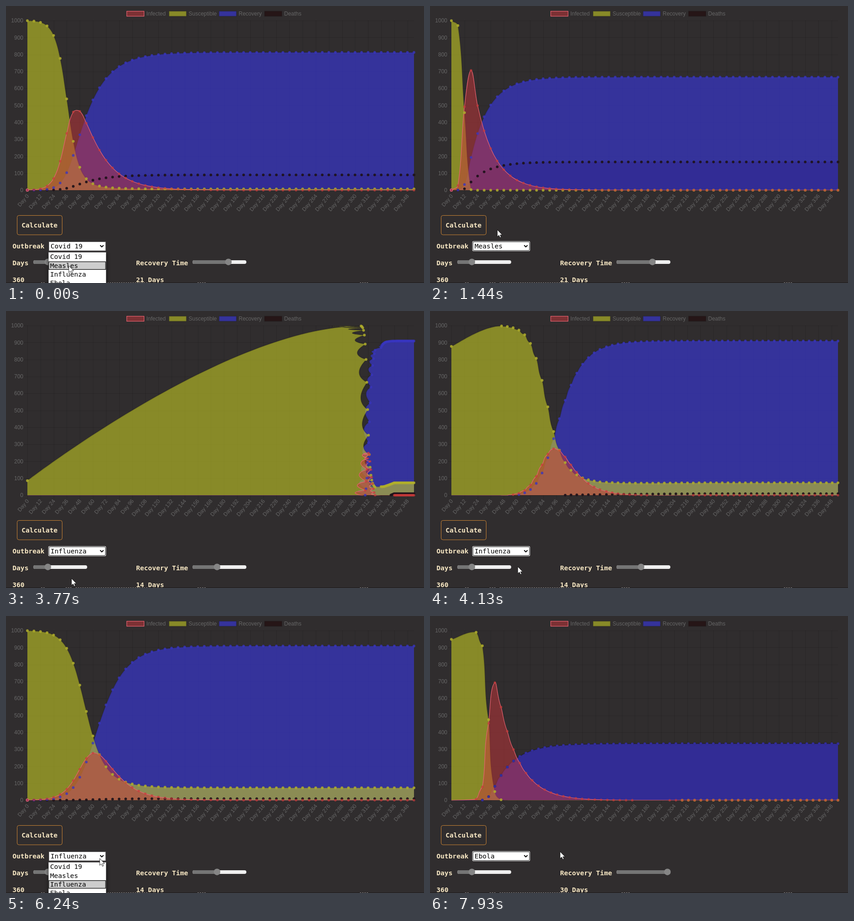
An HTML page with a canvas for the animation above (8000 ms loop, 919x609 px).

```html
<!DOCTYPE html>
<html lang="en">
<head>
<meta charset="utf-8">
<title>Outbreak chart</title>
<style>
  html, body { margin: 0; width: 100%; height: 100%; overflow: hidden; background: #302d2e; }
  svg, canvas { position: absolute; left: 0; top: 0; width: 919px; height: 609px; }
  .axis text { font: 12px "Liberation Sans", Arial, sans-serif; fill: #666; }
  .ui text { font: 14.6px "DejaVu Sans Mono", monospace; fill: #000; }
  .ui .b { font-weight: bold; fill: #f8e8c4; }
</style>
</head>
<body>
<svg id="axis" class="axis" viewBox="0 0 919 609">
  <g id="grid" stroke="#000" stroke-opacity=".13"></g>
  <g id="ticks"></g>
  <g id="legend"></g>
</svg>
<canvas id="chart" width="919" height="609"></canvas>
<svg class="ui" viewBox="0 0 919 609">
  <defs>
    <filter id="soft" x="-20%" y="-20%" width="140%" height="140%"><feGaussianBlur stdDeviation="3"/></filter>
  </defs>
  <rect x="24.5" y="460.5" width="99" height="42.5" rx="4" fill="none" stroke="#cb8434"/>
  <text class="b" x="34.3" y="486.5">Calculate</text>
  <text class="b" x="14.3" y="533">Outbreak</text>
  <text class="b" x="14.3" y="570">Days</text>
  <text class="b" x="286" y="570">Recovery Time</text>
  <text class="b" x="14.3" y="607">360</text>
  <text class="b" x="286" y="607" id="span"></text>

  <rect x="60" y="559" width="118.5" height="8" rx="4" fill="#efefef"/>
  <rect x="60" y="559" width="34" height="8" rx="4" fill="#757575"/>
  <circle cx="92" cy="562.7" r="7.2" fill="#858585"/>
  <rect x="410" y="559" width="118.5" height="8" rx="4" fill="#efefef"/>
  <rect x="410" y="559" width="80" height="8" rx="4" fill="#757575" id="bar"/>
  <circle cx="489" cy="562.7" r="7.2" fill="#858585" id="thumb"/>

  <rect y="608" width="919" height="1" fill="#1c1a1b"/>
  <path d="M77 608.5h9M131 608.5h13M153 608.5h160M421 608.5h20M778 608.5h18" stroke="#8a8788" stroke-dasharray="3 2"/>

  <g id="ring">
    <rect x="93" y="517" width="127" height="22" rx="3" fill="#fff"/>
    <rect x="94.5" y="518.5" width="124" height="19" rx="1.5" fill="#fff" stroke="#101010"/>
  </g>
  <rect id="plain" x="94.5" y="518.5" width="124.5" height="19.5" fill="#fff" stroke="#767676"/>
  <text x="98" y="533" id="choice"></text>
  <path d="M207 526l3.7 3.7 3.7-3.7" fill="none" stroke="#000" stroke-width="2"/>

  <g id="menu">
    <rect x="91" y="544" width="133" height="80" fill="#000" opacity=".35" filter="url(#soft)"/>
    <rect x="93.5" y="541.5" width="126.5" height="80" fill="#fff" stroke="#767676" stroke-width=".5"/>
    <rect id="hover" x="94" width="125" height="17" fill="#cdcdcd" stroke="#101010" stroke-width="1.3"/>
    <g id="rows"></g>
  </g>
  <path id="mouse" d="M0 0V15.2L3.5 12L6 17.3L8.4 16.2L6.1 11.2H10.8Z" fill="#fff" stroke="#000" stroke-width=".8"/>
</svg>
<script>
const $ = id => document.getElementById(id);
const L = 47, R = 897, TOP = 32, BOT = 405, N = 60;
const STEP = (R - L) / (N - 1);
const LOOP = 8000;

// beta: infections per day, days: recovery time, p: death rate
const outbreaks = [
  { name: 'Covid 19', beta: .25, days: 21, p: .1, thumb: 489 },
  { name: 'Measles', beta: .8, days: 21, p: .2, thumb: 489 },
  { name: 'Influenza', beta: .2, days: 14, p: .01, thumb: 464 },
  { name: 'Ebola', beta: .5, days: 30, p: .5, thumb: 522 }
];

// Back to front
const shade = 'rgba(0,0,0,.12)';
const styles = {
  D: { label: 'Deaths', at: 568, fill: 'rgba(28,0,0,.5)', line: shade, width: 2.4, dot: 'rgba(30,18,26,.92)', r: 2.9 },
  R: { label: 'Recovery', at: 468, fill: 'rgba(56,55,203,.7)', line: shade, width: 2.4, dot: 'rgba(56,54,192,.78)', r: 2.9 },
  S: { label: 'Susceptible', at: 358, fill: 'rgba(196,200,38,.6)', line: shade, width: 2.4, dot: 'rgba(176,174,44,.85)', r: 3 },
  I: { label: 'Infected', at: 265, fill: 'rgba(200,55,58,.5)', line: 'rgb(232,98,112)', width: 1.2, dot: 'rgba(200,58,58,.68)', r: 2.7 }
};

function simulate({ beta, days, p }) {
  const out = { S: [], I: [], R: [], D: [] };
  let s = 999, i = 1;
  for (let day = 0; day < N * 6; day++) {
    if (day % 6 === 0) {
      const gone = (1000 - s - i) / (1 + p);
      out.S.push(s);
      out.I.push(i);
      out.R.push(gone * (1 - p));
      out.D.push(gone * p);
    }
    const fresh = beta * s * i / 1000;
    s -= fresh;
    i += fresh - i * (1 + p) / days;
  }
  return out;
}

const clamp = (v, a, b) => Math.max(a, Math.min(b, v));
const mix = (a, b, e) => a + (b - a) * e;
const yOf = (v, bottom) => bottom - v / 1000 * (bottom - TOP);

// Smooth handles [x, y, inX, inY, outX, outY] around a point
function handles(a, b, c, right, bottom) {
  const d1 = Math.hypot(b[0] - a[0], b[1] - a[1]);
  const d2 = Math.hypot(c[0] - b[0], c[1] - b[1]);
  const fa = .4 * d1 / (d1 + d2 || 1), fb = .4 * d2 / (d1 + d2 || 1);
  const dx = c[0] - a[0], dy = c[1] - a[1];
  return [b[0], b[1],
    clamp(b[0] - fa * dx, L, right), clamp(b[1] - fa * dy, TOP, bottom),
    clamp(b[0] + fb * dx, L, right), clamp(b[1] + fb * dy, TOP, bottom)];
}

function settled(vals) {
  const pts = vals.map((v, i) => [L + i * STEP, yOf(v, BOT)]);
  return pts.map((b, i) => handles(pts[i - 1] || b, b, pts[i + 1] || b, R, BOT));
}

// Each point enters at the right edge; tilting labels shrink the plot as they fill up
function entering(vals) {
  return vals.map((v, i) => {
    if (!i) return [L, BOT + 17, L, BOT + 17, L, BOT + 17];
    const right = i < 19 ? R - 13 : R;
    const bottom = BOT + (i < 19 ? 17 : Math.max(0, 14 * (1 - (i - 19) / 16)));
    const b = [right, yOf(v, bottom)];
    const a = [right - (right - L) / i, yOf(vals[i - 1], bottom)];
    return handles(a, b, b, right, bottom);
  });
}

const shapes = outbreaks.map(o => {
  const data = simulate(o), set = {};
  for (const k in data) set[k] = { from: entering(data[k]), to: settled(data[k]) };
  return set;
});

const ctx = $('chart').getContext('2d');

function trace(pts) {
  ctx.moveTo(pts[0][0], pts[0][1]);
  for (let i = 1; i < N; i++) {
    const a = pts[i - 1], b = pts[i];
    ctx.bezierCurveTo(a[4], a[5], b[2], b[3], b[0], b[1]);
  }
}

function area(pts, style) {
  ctx.save();
  ctx.beginPath();
  ctx.rect(L - .5, TOP - 1, R - L + 1, BOT - TOP + 1.5);
  ctx.clip();
  ctx.beginPath();
  trace(pts);
  ctx.lineTo(R, BOT);
  ctx.lineTo(L, BOT);
  ctx.closePath();
  ctx.fillStyle = style.fill;
  ctx.fill();
  ctx.beginPath();
  trace(pts);
  ctx.strokeStyle = style.line;
  ctx.lineWidth = style.width;
  ctx.stroke();
  ctx.restore();
}

const inside = y => y < BOT + .08;

function dots(pts, style) {
  ctx.fillStyle = style.dot;
  for (const [x, y] of pts) {
    if (!inside(y)) continue;
    ctx.beginPath();
    ctx.arc(x, y, style.r, 0, 7);
    ctx.fill();
  }
}

function drawChart(index, e) {
  const now = {};
  for (const k in styles) {
    const { from, to } = shapes[index][k];
    now[k] = to.map((b, i) => b.map((v, j) => mix(from[i][j], v, e)));
  }
  ctx.clearRect(0, 0, 919, 609);
  for (const k in styles) area(now[k], styles[k]);
  for (const k in styles) dots(now[k], styles[k]);
  const [x, y] = now.I[0];
  if (inside(y)) {
    ctx.beginPath();
    ctx.arc(x, y, 2.8, 0, 7);
    ctx.strokeStyle = styles.I.line;
    ctx.lineWidth = 1.2;
    ctx.stroke();
  }
}

// Static axes and legend
const NS = 'http://www.w3.org/2000/svg';
function add(parent, tag, attrs, text) {
  const el = document.createElementNS(NS, tag);
  for (const k in attrs) el.setAttribute(k, attrs[k]);
  if (text !== undefined) el.textContent = text;
  $(parent).append(el);
}
for (let v = 0; v <= 1000; v += 100) {
  const y = yOf(v, BOT);
  add('grid', 'path', { d: `M39 ${Math.round(y) + .5}H${R}` });
  add('ticks', 'text', { x: 38, y: y + 4.2, 'text-anchor': 'end' }, v);
}
for (let i = 0; i < N; i += 2) {
  const x = L + i * STEP;
  add('grid', 'path', { d: `M${Math.round(x) + .5} ${TOP}V413` });
  add('ticks', 'text', { 'text-anchor': 'end', y: 4, transform: `translate(${x + 1} 415.5) rotate(-50)` }, 'Day ' + i * 6);
}
for (const k in styles) {
  const s = styles[k];
  add('legend', 'rect', { x: s.at + .5, y: 11.5, width: 38, height: 11, fill: s.fill,
    stroke: s.line, 'stroke-width': s.width });
  add('legend', 'text', { x: s.at + 43.5, y: 21 }, s.label);
}
outbreaks.forEach((o, i) => add('rows', 'text', { x: 97, y: 556.3 + 19.3 * i }, o.name));

// Moments when the picture refreshes: first, last, count
const beats = [0];
for (const [a, b, n] of [[90, 1440, 16], [1620, 2340, 9], [2620, 2620, 1], [2800, 3310, 7],
  [3770, 4490, 9], [4580, 4990, 6], [5170, 5260, 2], [5530, 5530, 1], [5710, 5710, 1],
  [6240, 7020, 10], [7110, 7110, 1], [7480, 7930, 6]]) {
  for (let i = 0; i < n; i++) beats.push(n > 1 ? a + (b - a) * i / (n - 1) : a);
}

// start time, outbreak, progress already made at the start
const picks = [[0, 0, 1], [90, 1, .0465], [3770, 2, .033], [7480, 3, .052]];
const menus = [[0, 90], [2620, 3770], [6240, 7480]];

const path = [
  [0, 138, 571], [90, 140, 569], [360, 162, 541], [810, 150, 492], [1440, 148, 492],
  [1620, 151, 487], [1800, 163, 477], [2070, 220, 500], [2340, 210, 527], [2620, 210, 527],
  [3310, 146, 587], [3770, 144, 588], [4130, 193, 562], [4580, 196, 560], [4990, 207, 543],
  [5170, 207, 541], [5260, 207, 536], [5530, 207, 533], [5710, 206, 533], [6240, 206, 533],
  [7020, 151, 604], [7110, 151, 612], [7480, 176, 612], [7930, 286, 518], [8000, 286, 518]
];
function mouseAt(t) {
  const i = path.findIndex(p => p[0] > t);
  const a = path[i - 1], b = path[i], f = (t - a[0]) / (b[0] - a[0]);
  return [mix(a[1], b[1], f), mix(a[2], b[2], f)];
}

const show = (id, on) => $(id).setAttribute('visibility', on ? 'visible' : 'hidden');
let last = -1;

function render(time) {
  const t = beats.filter(b => b <= time + .01).pop();
  if (t === last) return;
  last = t;

  const [start, index, lead] = picks.filter(p => p[0] <= t).pop();
  const u = Math.min(1, lead + (t - start) * .001063);
  drawChart(index, 1 - (1 - u) ** 4);

  const o = outbreaks[index];
  $('choice').textContent = o.name;
  $('span').textContent = o.days + ' Days';
  $('thumb').setAttribute('cx', o.thumb);
  $('bar').setAttribute('width', o.thumb - 408);

  const [x, y] = mouseAt(t);
  $('mouse').setAttribute('transform', `translate(${x} ${y})`);

  const open = menus.some(([a, b]) => t >= a && t < b);
  show('menu', open);
  show('plain', open);
  show('ring', !open);
  const row = y < 542 ? index : clamp(Math.floor((y - 542) / 19.3), 0, 3);
  $('hover').setAttribute('y', 543 + 19.3 * row);
}

const origin = performance.now();
function loop() {
  render((performance.now() - origin) % LOOP);
  requestAnimationFrame(loop);
}
loop();
</script>
</body>
</html>
```
